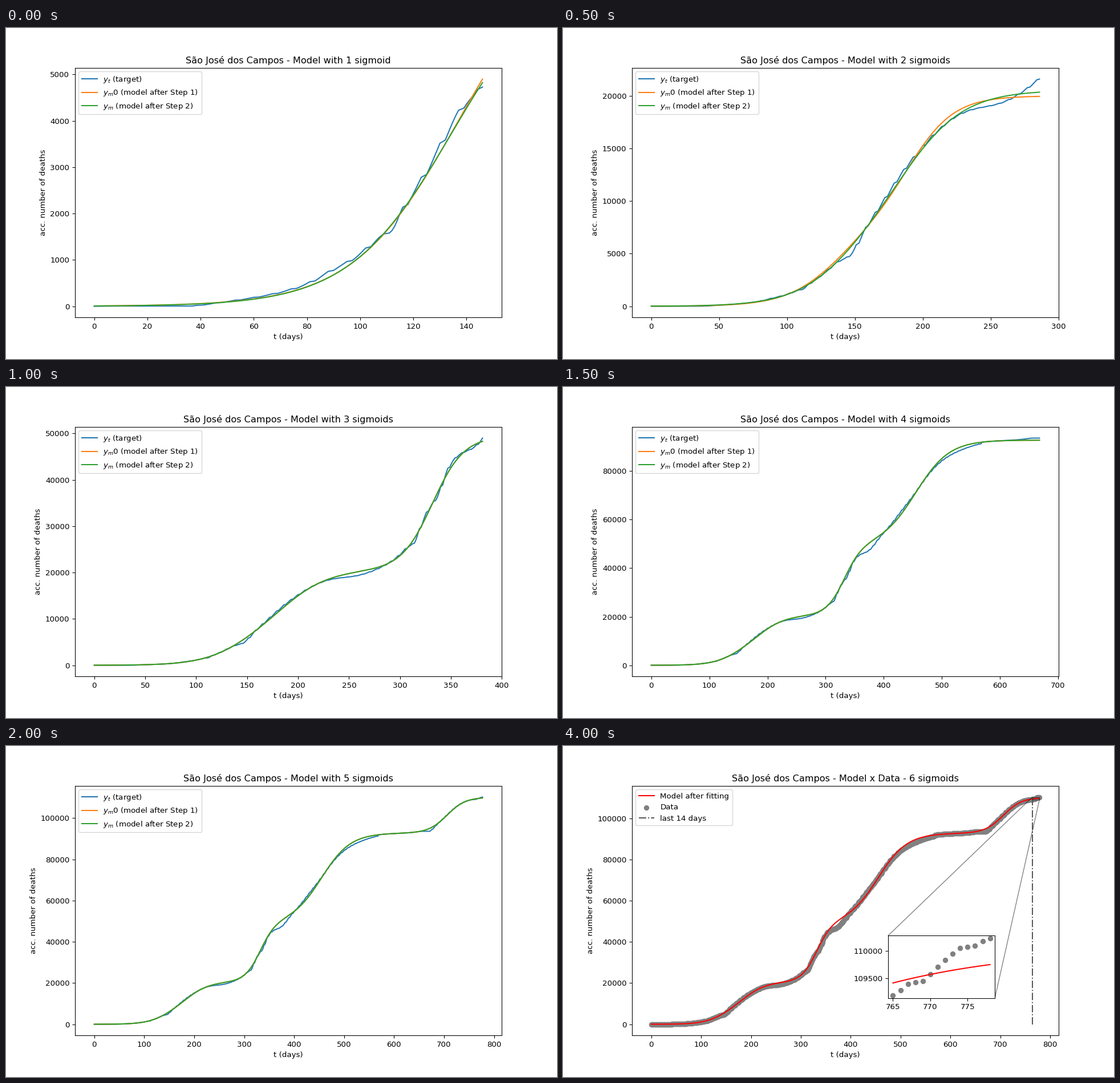
These frames come from a looping animation (966x580 px, 5000 ms). A matplotlib script:

```python
import matplotlib.pyplot as plt
import numpy as np
from matplotlib.animation import FuncAnimation

CITY = "São José dos Campos"
LAST_DAYS = [146, 286, 381, 668, 777, 778]
LAST_STAGE = len(LAST_DAYS) - 1

# Each wave is a sigmoid: (size, rate, middle day).
WAVES = [(6500, 0.046, 142), (14030, 0.044, 187.5), (28900, 0.065, 332),
         (43300, 0.0345, 455), (17370, 0.054, 706)]
ONE_WAVE_GUESS = [(7955, 0.0508, 136.7)]
ONE_WAVE_FIT = [(7450, 0.052, 134.3)]
TWO_WAVE_GUESS = ONE_WAVE_GUESS + [(12030, 0.06, 191)]

# Where reports strayed from the waves: (size, middle day, width).
DEVIATIONS = [(-55, 34, 10), (60, 90, 5), (-150, 112.5, 2.5),
              (-780, 148, 5.5), (300, 183, 12), (-850, 258, 17),
              (-1300, 315, 4), (-1700, 338, 5), (-3000, 375, 12),
              (1100, 430, 14), (-1400, 672, 8), (-290, 764, 5),
              (500, 779, 6)]
BACKLOG = (-1400, 525, 32)
BACKLOG_CLEARED = 569


def sigmoids(waves, t):
    return sum(size / (1 + np.exp(-rate * (t - mid)))
               for size, rate, mid in waves)


def bump(t, size, mid, width):
    return size * np.exp(-((t - mid) / width) ** 2 / 2)


def reported_counts():
    """Waves plus deviations, on a clock that slows down at weekends."""
    days = np.arange(LAST_DAYS[-1] + 1)
    pace = np.where(days % 7 >= 5, 0.3, 1.28)
    t = np.cumsum(pace) - pace[0]
    counts = sigmoids(WAVES, t) + sum(bump(t, *d) for d in DEVIATIONS)
    counts += np.where(t < BACKLOG_CLEARED, bump(t, *BACKLOG), 0)
    return np.maximum.accumulate(counts - counts[0])


COUNTS = reported_counts()


def fitted_waves(stage):
    return WAVES[:stage + 1] if stage else ONE_WAVE_FIT


def guessed_waves(stage):
    guesses = [ONE_WAVE_GUESS, TWO_WAVE_GUESS]
    return guesses[stage] if stage < len(guesses) else fitted_waves(stage)


def draw_fit(ax, stage, days, counts, fit):
    ax.plot(days, counts, label="$y_t$ (target)")
    ax.plot(days, sigmoids(guessed_waves(stage), days),
            label="$y_m0$ (model after Step 1)")
    ax.plot(days, fit, label="$y_m$ (model after Step 2)")
    plural = "s" if stage else ""
    ax.set_title(f"{CITY} - Model with {stage + 1} sigmoid{plural}")


def draw_result(ax, days, counts, fit):
    ax.plot(days, fit, "r", label="Model after fitting")
    ax.scatter(days, counts, color="gray", label="Data")
    ax.vlines(days[-1] - 14, 0, counts[-1], color="0.35",
              linestyles="dashdot", label="last 14 days")
    ax.set_title(f"{CITY} - Model x Data - {LAST_STAGE + 1} sigmoids")

    zoom = ax.inset_axes([0.6, 0.15, 0.25, 0.25])
    zoom.plot(days[-14:], fit[-14:], "r")
    zoom.scatter(days[-14:], counts[-14:], color="gray")
    ax.indicate_inset_zoom(zoom, edgecolor="black")


def update(tick):
    stage = min(tick, LAST_STAGE)
    days = np.arange(LAST_DAYS[stage] + 1)
    counts = COUNTS[:len(days)]
    fit = sigmoids(fitted_waves(stage), days)
    fig.clear()
    ax = fig.add_axes([0.125, 0.125, 0.775, 0.755])
    if stage < LAST_STAGE:
        draw_fit(ax, stage, days, counts, fit)
    else:
        draw_result(ax, days, counts, fit)
    ax.set_xlabel("t (days)")
    ax.set_ylabel("acc. number of deaths")
    ax.legend(loc="upper left")


# 966 x 580 pixels
fig = plt.figure(figsize=(10, 6.00415), dpi=96.6)
anim = FuncAnimation(fig, update, frames=10, interval=500, repeat=True)
plt.show()
```
